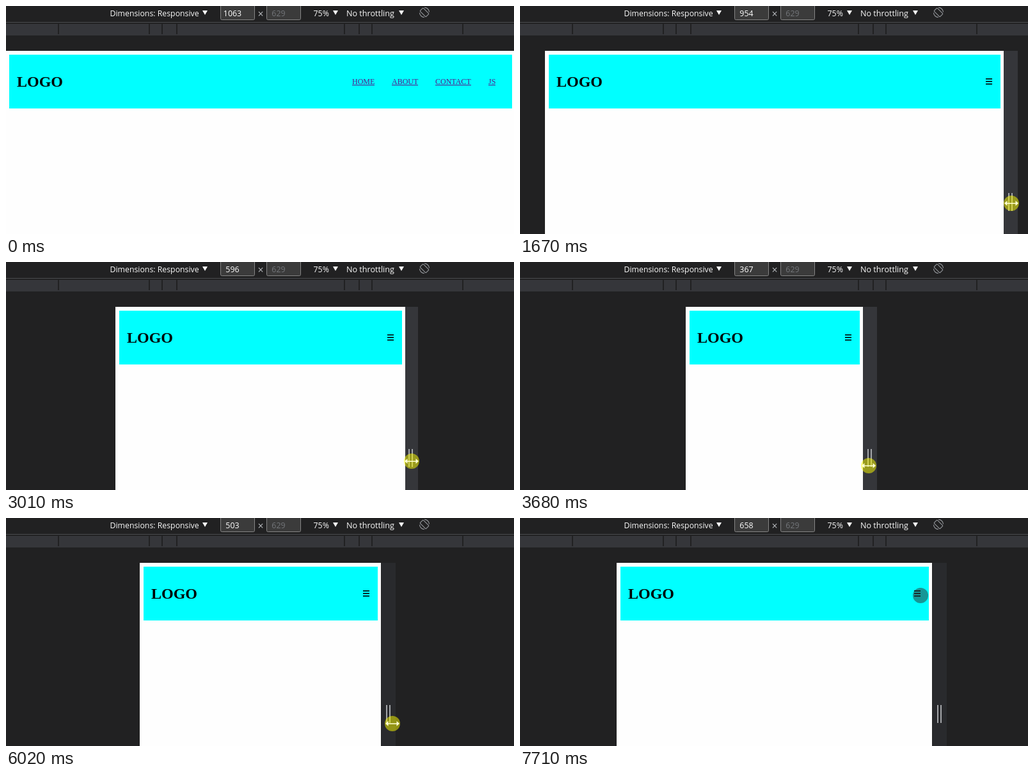
These frames come from a looping animation (794 by 356 pixels, 8 s). An HTML page with a canvas:

```html
<!DOCTYPE html>
<html lang="en">
<head>
<meta charset="utf-8">
<title>Responsive header</title>
<style>
  html, body { margin: 0; width: 100%; height: 100%; overflow: hidden; background: #212122; }
  canvas { display: block; }
</style>
</head>
<body>
<canvas id="stage" width="794" height="356"></canvas>
<script>
const ctx = document.getElementById('stage').getContext('2d');
const LOOP = 8000, TICK = 335, PHASE = 12;
const MID = 397.5, ZOOM = 0.75, BREAKPOINT = 1024;
const PAINT_LAG = 0.05, HOVER_END = 17, RELEASE = 21;
const BACK = '#212122', WHITE = '#fafafa';
const UI = '"Open Sans", "Noto Sans", sans-serif';
const SERIF = '"Liberation Serif", "Times New Roman", serif';

// Key points are [tick, value], eased in between and sampled once per tick.
const viewport = track([[3, 1063], [4, 1052], [5, 954], [6, 915], [11.5, 354], [13, 335], [16.1, 335], [19.8, 658]]);
const gripX = track([[9, 13], [11, 10], [16, 16], [18, 18], [20, 17], [21, -18]]);
const pointerY = track([[5, 308], [9, 311], [11, 318], [19.7, 321], [23, 121]]);

function track(keys) {
  return tick => {
    const next = keys.findIndex(k => k[0] > tick);
    if (next === 0) return keys[0][1];
    if (next < 0) return keys.at(-1)[1];
    const [t0, a] = keys[next - 1], [t1, b] = keys[next];
    const u = (tick - t0) / (t1 - t0);
    return a + (b - a) * u * u * (3 - 2 * u);
  };
}

function rect(x, y, w, h, color) {
  ctx.fillStyle = color;
  ctx.fillRect(x, y, w, h);
}

function text(str, x, y, font, color, align = 'left') {
  ctx.font = font;
  ctx.fillStyle = color;
  ctx.textAlign = align;
  ctx.fillText(str, x, y);
}

function triangle(points, color) {
  ctx.beginPath();
  points.forEach(([x, y]) => ctx.lineTo(x, y));
  ctx.fillStyle = color;
  ctx.fill();
}

function dropdown(x) {
  triangle([[x, 7], [x + 8, 7], [x + 4, 14]], WHITE);
}

function field(x, value, center, color) {
  ctx.beginPath();
  ctx.roundRect(x + 0.5, -4.5, 53, 26, 2);
  ctx.fillStyle = '#3b3b3b';
  ctx.fill();
  ctx.strokeStyle = '#858585';
  ctx.lineWidth = 1;
  ctx.stroke();
  text(value, center, 16, `12.4px ${UI}`, color, 'center');
}

function rotateIcon(x, y) {
  ctx.save();
  ctx.translate(x, y);
  ctx.rotate(Math.PI / 4);
  ctx.strokeStyle = '#8f9296';
  ctx.lineWidth = 1.2;
  ctx.beginPath();
  ctx.roundRect(-6.5, -3.5, 13, 7, 1);
  ctx.stroke();
  for (const a of [0, Math.PI]) {
    ctx.beginPath();
    ctx.arc(0, 0, 7.6, a + 0.8, a + 2.3);
    ctx.stroke();
  }
  ctx.restore();
}

function toolbar(width) {
  text('Dimensions: Responsive', 162.5, 16, `12.3px ${UI}`, WHITE);
  dropdown(307);
  field(335, Math.round(width), 354, '#fff');
  text('×', 398, 18, `16px ${UI}`, '#b4b7bb', 'center');
  field(407, 629, 426, '#73767a');
  text('75%', 480.5, 16, `12.4px ${UI}`, WHITE);
  dropdown(511);
  text('No throttling', 532, 16, `12.6px ${UI}`, WHITE);
  dropdown(614);
  rotateIcon(654, 10);
  rect(0, 25, 794, 1, '#4a4c50');
  rect(0, 28, 794, 18, '#35363a');
  for (const d of [131, 154, 174, 316]) {
    for (const side of [-d, d]) rect(397 + side, 28, 2, 16, BACK);
  }
}

function menu(right) {
  let x = right - 255;
  for (const label of ['HOME', 'ABOUT', 'CONTACT', 'JS']) {
    text(label, x, 122, `12px ${SERIF}`, '#551a8b');
    const w = Math.round(ctx.measureText(label).width);
    rect(x, 123, w, 1, '#551a8b');
    x += w + 27;
  }
}

function page(width) {
  const half = width * ZOOM / 2;
  const left = Math.round(MID - half), right = Math.round(MID + half);
  rect(left, 70, right - left, 286, '#fefefe');
  rect(left + 6, 76, right - left - 11, 84, '#0ff');
  text('LOGO', left + 18, 126, `bold 24px ${SERIF}`, '#000');
  if (width > BREAKPOINT) menu(right);
  else for (let i = 0; i < 3; i++) rect(right - 28, 113 + i * 4, 10, 1.6, '#000');
}

function gutter(edge, hovered) {
  const x = Math.round(edge);
  rect(x + 1, 70, 22, 286, hovered ? '#35363a' : '#292a2d');
  for (const dx of [8, 13]) rect(x + dx, 292, 2, 28, '#a3a5a8');
}

function pointer(x, y, pressed) {
  ctx.beginPath();
  ctx.arc(x, y, 12, 0, Math.PI * 2);
  ctx.fillStyle = pressed ? 'rgba(255,255,0,.5)' : 'rgba(45,45,45,.5)';
  ctx.fill();
  if (!pressed) return;
  const color = '#ffffd0';
  rect(x - 8, y - 0.5, 16, 1.5, color);
  for (const s of [-1, 1]) {
    triangle([[x + s * 11, y], [x + s * 6.5, y - 4], [x + s * 6.5, y + 4]], color);
  }
}

function draw(t) {
  const tick = Math.floor((t + PHASE) / TICK);
  const width = viewport(tick);
  const edge = MID + width * ZOOM / 2;
  rect(0, 0, 794, 356, BACK);
  toolbar(width);
  gutter(edge, tick < HOVER_END);
  page(Math.max(width, viewport(tick - PAINT_LAG)));
  pointer(Math.round(edge + gripX(tick)), Math.round(pointerY(tick)), tick < RELEASE);
}

let origin;
function loop(now) {
  origin ??= now;
  draw((now - origin) % LOOP);
  requestAnimationFrame(loop);
}
requestAnimationFrame(loop);
</script>
</body>
</html>
```
